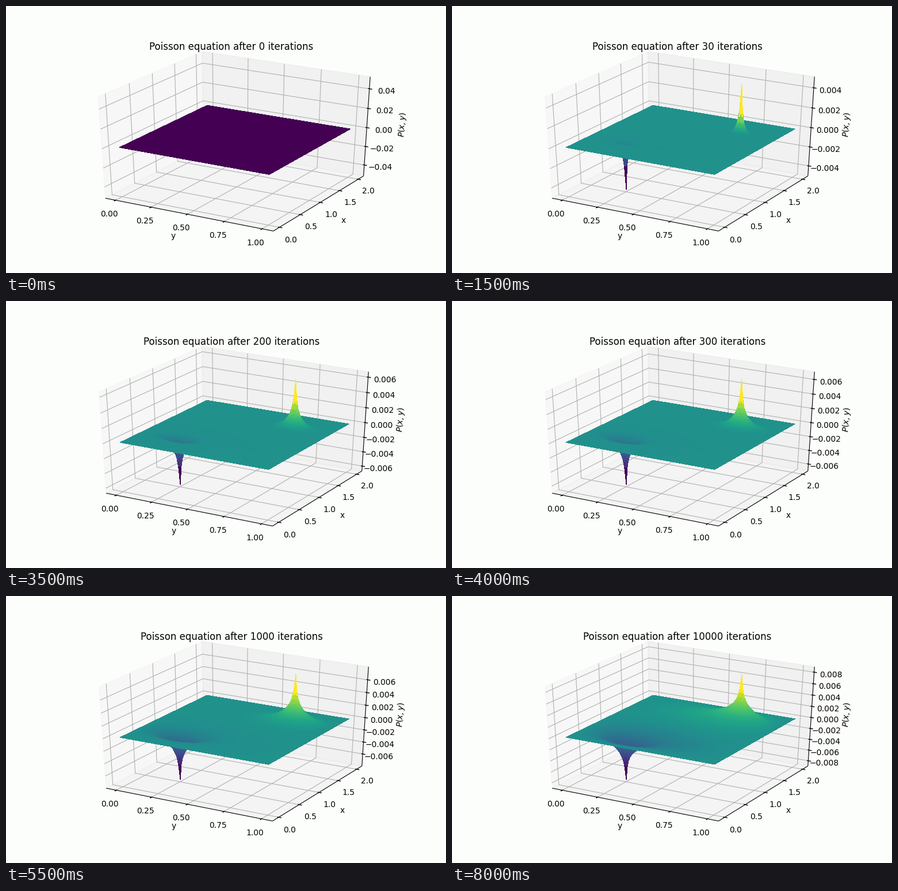
A matplotlib script that plays this animation: 765x463 px, repeating every 8.5 s.

```python
import numpy as np
import matplotlib.pyplot as plt
from matplotlib.animation import FuncAnimation
from matplotlib.collections import LineCollection, PolyCollection
from matplotlib.patches import Polygon
from matplotlib.ticker import MaxNLocator

W, H, DPI = 765, 463, 100
BG = "#fcfefb"
STEPS = [0, 10, 20, 30, 40, 50, 100, 200, 300, 400, 500,
         1000, 2000, 3000, 4000, 5000, 10000]

# Plot area in pixels, and the window of projected coordinates it shows
BOTTOM, HEIGHT = 0.11 * H, 0.77 * H
VIEW_LOW, VIEW_SPAN = -0.095, 0.185

# Camera on a unit cube centred on the origin
ELEV, AZIM, DIST = np.radians(30), np.radians(-60), 10
CE, SE, CA, SA = np.cos(ELEV), np.sin(ELEV), np.cos(AZIM), np.sin(AZIM)

EDGE = 25 / 48          # half size of the drawn box
DELTA = 1 / 12
POINT = 48 / (72 * (0.775 * W + HEIGHT) / DPI) * DELTA
TICK_PAD, LABEL_PAD = 11.5 * POINT, 25 * POINT
FAR = np.array([-EDGE, EDGE, -EDGE])
# axis index -> edge it runs along, direction and sign of its ticks
EDGES = [((0, -EDGE, -EDGE), 1, 1),
         ((EDGE, 0, -EDGE), 0, -1),
         ((EDGE, EDGE, 0), 0, -1)]
PANE_GREYS = (0.95, 0.90, 0.925)

NX, NY = 200, 100
xs, ys = np.linspace(0, 2, NX), np.linspace(0, 1, NY)


def solve():
    """Jacobi iteration of the Poisson equation, kept at each of STEPS."""
    dx2, dy2 = (2 / (NX - 1)) ** 2, (1 / (NY - 1)) ** 2
    total = 2 * (dx2 + dy2)
    wx, wy = dy2 / total, dx2 / total
    source = np.zeros((NY, NX))
    source[NY // 4, NX // 4] = 100
    source[3 * NY // 4, 3 * NX // 4] = -100
    push = (source * dx2 * dy2 / total)[1:-1, 1:-1]
    p = np.zeros((NY, NX))
    states = [p.copy()]
    for n in range(1, STEPS[-1] + 1):
        p[1:-1, 1:-1] = (wx * (p[1:-1, 2:] + p[1:-1, :-2])
                         + wy * (p[2:, 1:-1] + p[:-2, 1:-1]) - push)
        if n in STEPS:
            states.append(p.copy())
    return states


def unit(v, low, high):
    return (v - low) / (high - low) - 0.5


def project(pts, left, width):
    """Pixel positions and depths of points in the cube."""
    x, y, z = np.moveaxis(np.asarray(pts, float), -1, 0)
    depth = DIST - (CE * CA * x + CE * SA * y + SE * z)
    across = (-SA * x + CA * y) / depth
    up = (-SE * CA * x - SE * SA * y + CE * z) / depth
    px = left + (across - VIEW_LOW) / VIEW_SPAN * width
    py = BOTTOM + (up - VIEW_LOW) / VIEW_SPAN * HEIGHT
    return np.stack([px, py], -1), depth


def along(edge, index, value):
    pos = np.array(edge, float)
    pos[index] = value
    return pos


def outward(pos, index, pad):
    """Push a point away from the box, but not along its own axis."""
    moved = pos + np.sign(pos) * pad
    moved[index] = pos[index]
    return moved


def draw_panes(area):
    for i, grey in enumerate(PANE_GREYS):
        a, b = [k for k in range(3) if k != i]
        corners = []
        for s, t in ((-1, -1), (1, -1), (1, 1), (-1, 1)):
            c = FAR.copy()
            c[a], c[b] = s * EDGE, t * EDGE
            corners.append(c)
        ax.add_patch(Polygon(project(corners, *area)[0], color=(grey,) * 3,
                             alpha=0.5, lw=1, zorder=1))


def draw_axis(i, ticks, names, title, area):
    edge, tick_dir, sign = EDGES[i]
    ends = project([along(edge, i, -EDGE), along(edge, i, EDGE)], *area)[0]
    grid, marks = [], []
    for value, name in zip(ticks, names):
        corner = along(FAR, i, value)
        first, last = corner.copy(), corner.copy()
        first[(i + 1) % 3] *= -1
        last[(i + 2) % 3] *= -1
        grid.append(project([first, corner, last], *area)[0])

        pos = along(edge, i, value)
        start, stop = pos.copy(), pos.copy()
        start[tick_dir] += 0.1 * sign * DELTA
        stop[tick_dir] -= 0.2 * sign * DELTA
        marks.append(project([start, stop], *area)[0])
        spot = project(outward(pos, i, TICK_PAD), *area)[0]
        ax.text(*spot, name, size=10, ha="center", va="top")

    ax.add_collection(LineCollection([ends], colors="k", linewidths=0.8, zorder=2))
    ax.add_collection(LineCollection(grid, colors="#b0b0b0", linewidths=0.8, zorder=2))
    ax.add_collection(LineCollection(marks, colors="k", linewidths=1, zorder=3))

    run, rise = ends[1] - ends[0]
    angle = np.degrees(np.arctan2(rise, run)) if len(title) > 4 else 0
    spot = project(outward(np.array(edge, float), i, LABEL_PAD), *area)[0]
    ax.text(*spot, title, size=10, ha="center", va="center", rotation=angle)


def corners_of(grid):
    return np.stack([grid[:-1, :-1], grid[1:, :-1], grid[1:, 1:], grid[:-1, 1:]], 2)


def draw_surface(p, low, high, area):
    across, along_x = np.meshgrid(unit(ys, -0.05, 1.05), unit(xs, -0.1, 2.1),
                                  indexing="ij")
    pts, depth = project(np.stack([across, along_x, unit(p, low, high)], -1), *area)
    quads = corners_of(pts).reshape(-1, 4, 2)
    order = np.argsort(-corners_of(depth).mean(2).ravel(), kind="stable")
    level = corners_of(p).mean(2).ravel()
    level = (level - level.min()) / (np.ptp(level) or 1)
    ax.add_collection(PolyCollection(quads[order],
                                     facecolors=plt.cm.viridis(level[order]),
                                     edgecolors="none", linewidths=0,
                                     antialiaseds=False, zorder=4))


def draw(k):
    ax.clear()
    ax.set(xlim=(0, W), ylim=(0, H))
    ax.axis("off")
    p = states[k]
    flat = STEPS[k] == 0
    area = (93.4, 598.6) if flat else (0.125 * W, 0.775 * W)
    low, high = (-0.05, 0.05) if flat else (p.min(), p.max())

    z_ticks = MaxNLocator(9, steps=[1, 2, 2.5, 5, 10]).tick_values(low, high)
    z_ticks = [round(t, 6) + 0.0 for t in z_ticks if low <= t <= high]
    z_names = [f"{t:.{2 if flat else 3}f}".replace("-", "\u2212") for t in z_ticks]
    y_ticks, x_ticks = np.linspace(0, 1, 5), np.linspace(0, 2, 5)

    draw_panes(area)
    draw_axis(0, unit(y_ticks, -0.05, 1.05), [f"{t:.2f}" for t in y_ticks], "y", area)
    draw_axis(1, unit(x_ticks, -0.1, 2.1), [f"{t:.1f}" for t in x_ticks], "x", area)
    draw_axis(2, unit(np.array(z_ticks), low, high), z_names, "$P(x,y)$", area)
    draw_surface(p, low, high, area)
    ax.text(0.5125 * W, BOTTOM + 0.92 * HEIGHT + 6 * DPI / 72,
            f"Poisson equation after {STEPS[k]} iterations",
            size=12, ha="center", va="baseline", zorder=5)
    return []


plt.rcParams["font.family"] = "DejaVu Sans"
states = solve()
fig = plt.figure(figsize=(W / DPI, H / DPI), dpi=DPI, facecolor=BG)
ax = fig.add_axes([0, 0, 1, 1])
anim = FuncAnimation(fig, draw, frames=len(STEPS), init_func=lambda: [],
                     interval=500, repeat=True, repeat_delay=0)
plt.show()
```
